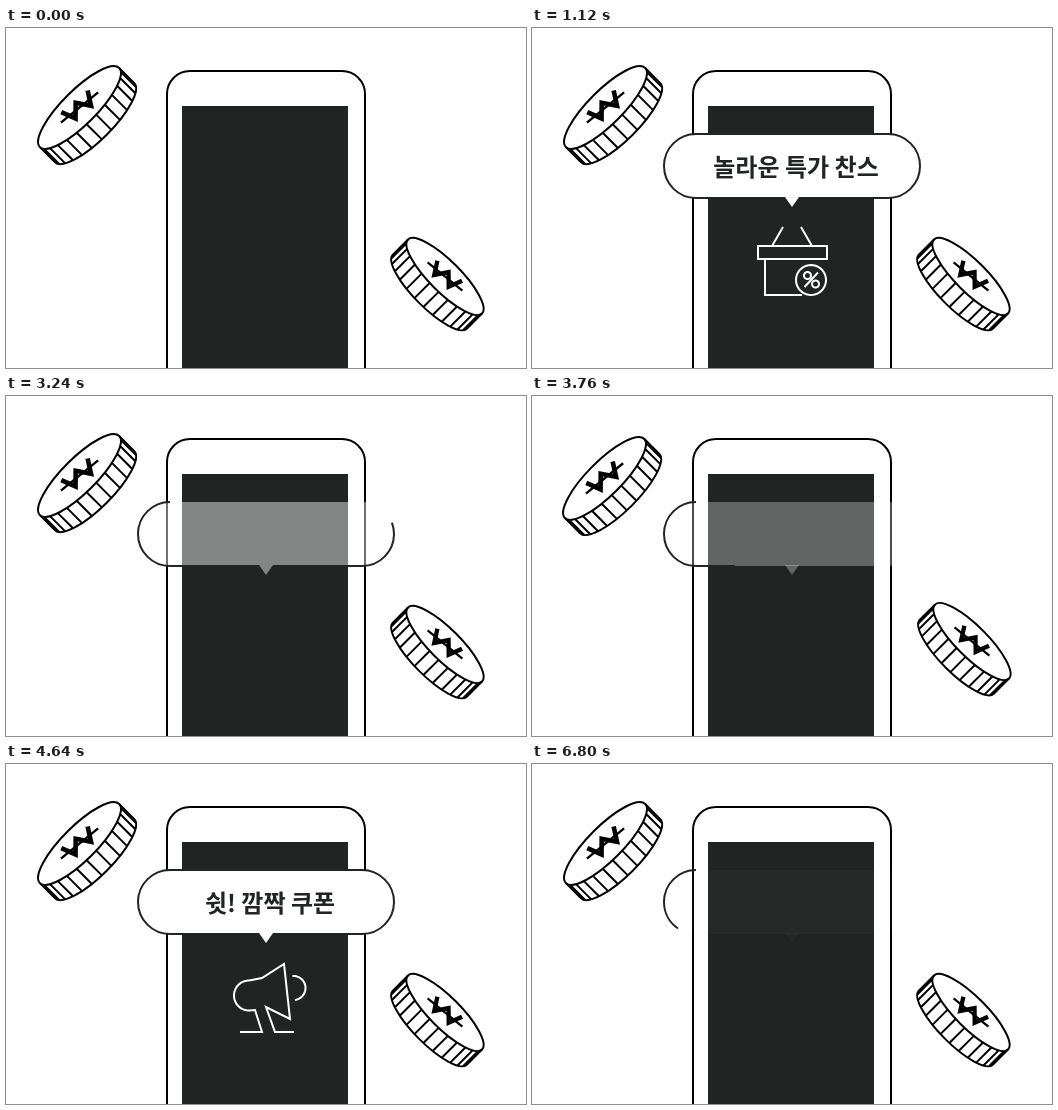
Write an HTML page with a canvas that moves like this. It is 520x340 px and loops after 6840 ms.

```html
<!DOCTYPE html>
<html lang="ko">
<head>
<meta charset="utf-8">
<style>
html, body { margin: 0; width: 100%; height: 100%; overflow: hidden; background: #fff; }
canvas { display: block; }
</style>
</head>
<body>
<canvas id="stage" width="520" height="340"></canvas>
<script>
const ctx = document.getElementById('stage').getContext('2d');
const LOOP = 6840, STEP = 40;
const INK = '#222424';
const { PI, sin, cos, hypot, min, max } = Math;

const clamp = v => min(1, max(0, v));
const ramp = (t, from, to) => clamp((t - from) / (to - from));
const ease = p => (1 - cos(PI * p)) / 2;

function arc(x, y, r, from, to, steps = 40) {
  return Array.from({ length: steps + 1 }, (_, i) => {
    const a = (from + (to - from) * i / steps) * PI;
    return [x + r * cos(a), y + r * sin(a)];
  });
}

const basket = [
  [[269, 199], [280, 218], [295, 218], [295, 231], [226, 231], [226, 218], [280, 218]],
  [[240, 218], [251, 199]],
  [[233, 232], [233, 267], [270, 267]],
  arc(279, 252, 15, 0.75, 2.75)
];
const percent = [
  [[272.5, 259], [286, 244.5]],
  arc(275.5, 247.5, 3.5, 0, 2),
  arc(283.5, 256, 3.5, 0, 2)
];
const megaphone = [
  [[234, 268], [256, 268], [249, 246], ...arc(243, 231.5, 15, 0.5, 1.5),
    [256, 214], [278, 200], [284, 255], [260, 243], [269, 268], [288, 268]],
  arc(287.5, 224, 12, -0.53, 0.46)
];

const scenes = [
  { start: 40, leave: 2760, end: 3400, text: '놀라운 특가 찬스',
    icons: [{ lines: basket, enter: [70, 680], exit: [70, 400] },
            { lines: percent, enter: [960, 1080], exit: [0, 100] }] },
  { start: 3640, leave: 6200, end: 6840, text: '쉿! 깜짝 쿠폰',
    icons: [{ lines: megaphone, enter: [160, 1000], exit: [-10, 400] }] }
];

const segment = (a, b) => hypot(b[0] - a[0], b[1] - a[1]);
const lengthOf = line => line.slice(1).reduce((sum, p, i) => sum + segment(line[i], p), 0);

// Strokes the first part of a list of polylines, one after another.
function trace(lines, amount) {
  if (amount <= 0) return;
  let left = amount * lines.reduce((sum, line) => sum + lengthOf(line), 0);
  ctx.beginPath();
  for (const line of lines) {
    if (left <= 0) break;
    ctx.moveTo(...line[0]);
    for (let i = 1; i < line.length && left > 0; i++) {
      const [a, b] = [line[i - 1], line[i]];
      const len = segment(a, b), k = len ? min(1, left / len) : 1;
      ctx.lineTo(a[0] + (b[0] - a[0]) * k, a[1] + (b[1] - a[1]) * k);
      left -= len;
    }
  }
  ctx.stroke();
}

function drawPhone() {
  ctx.lineWidth = 2;
  ctx.strokeStyle = '#000';
  ctx.fillStyle = '#fff';
  ctx.beginPath();
  ctx.roundRect(161, 43, 198, 340, 23);
  ctx.fill();
  ctx.stroke();
  ctx.fillStyle = INK;
  ctx.fillRect(176, 78, 166, 262);
}

function drawCoin(x, y, angle, a, b, depth) {
  ctx.save();
  ctx.translate(x, y);
  ctx.rotate(angle);
  ctx.lineWidth = 2;
  ctx.lineJoin = 'round';
  ctx.strokeStyle = '#000';

  ctx.beginPath();
  ctx.ellipse(0, 0, a, b, 0, 0, PI, true);
  ctx.lineTo(-a, depth);
  ctx.ellipse(0, depth, a, b, 0, PI, 0, true);
  ctx.closePath();
  ctx.fillStyle = '#fff';
  ctx.fill();
  ctx.stroke();

  // Ribs sit at equal angles around the rim, so they crowd towards the tips.
  ctx.beginPath();
  ctx.ellipse(0, 0, a, b, 0, 0, PI);
  const ribs = 13;
  for (let i = 1; i < ribs; i++) {
    const turn = PI * i / ribs;
    const rx = a * cos(turn), ry = b * sin(turn);
    ctx.moveTo(rx, ry);
    ctx.lineTo(rx, ry + depth);
  }
  ctx.stroke();

  ctx.rotate(-angle * 0.13);
  ctx.scale(a / 56, a / 56);
  ctx.lineJoin = 'miter';
  ctx.lineWidth = 4.6;
  ctx.beginPath();
  [[-17, -8], [-10, 6], [0, -6], [10, 6], [17, -8]].forEach(p => ctx.lineTo(...p));
  ctx.stroke();
  ctx.lineWidth = 2.4;
  ctx.beginPath();
  ctx.moveTo(-24, 0);
  ctx.lineTo(24, 0);
  ctx.stroke();
  ctx.restore();
}

function drawCoins(t) {
  let first = 0, second = 0;
  for (const { start } of scenes) {
    const dt = t - start;
    if (dt < 0 || dt > 680) continue;
    const dip = dt < 280;
    const wave = dip ? sin(PI * dt / 280) : -sin(PI * (dt - 280) / 400);
    first = wave * (dip ? 3 : 5.5);
    second = -wave * (dip ? 3 : 7.5);
  }
  drawCoin(73.5 - first / 3, 79.5 + first, -PI / 4, 56, 17, 21.5);
  drawCoin(439 - second / 3, 248.5 + second, PI / 4, 52.3, 15.5, 21.5);
}

function drawBubble(alpha, outline) {
  ctx.globalAlpha = alpha;
  ctx.fillStyle = '#fff';
  ctx.beginPath();
  ctx.roundRect(132, 106, 256, 64, 32);
  ctx.fill();
  ctx.globalAlpha = 1;

  const r = 32, run = 192, total = 2 * PI * r + 2 * run;
  if (outline > 0) {
    ctx.strokeStyle = INK;
    ctx.lineWidth = 2;
    ctx.setLineDash(outline < 1 ? [outline * total, total] : []);
    ctx.beginPath();
    ctx.arc(164, 138, r, -PI / 2, PI / 2, true);
    ctx.arc(356, 138, r, PI / 2, -PI / 2, true);
    ctx.closePath();
    ctx.stroke();
    ctx.setLineDash([]);
  }

  ctx.globalAlpha = alpha;
  ctx.beginPath();
  [[253, 169], [267, 169], [260, 179]].forEach(p => ctx.lineTo(...p));
  ctx.fill();
  ctx.globalAlpha = 1;
}

function drawScene({ start, leave, end, text, icons }, t) {
  if (t < start || t >= end) return;
  const dt = t - start, out = t - leave;
  const leaving = out >= 0;

  drawBubble(
    ease(leaving ? 1 - ramp(out, 305, 632) : ramp(dt, 0, 330)),
    ease(leaving ? 1 - ramp(out, 320, 690) : ramp(dt, 0, 370)));

  const typed = leaving
    ? text.length - Math.floor(out / 40)
    : Math.floor((dt - 260) / 50) + 1;
  ctx.fillStyle = INK;
  ctx.font = 'bold 24px "Noto Sans CJK KR", "Noto Sans CJK JP", "Noto Sans CJK", sans-serif';
  ctx.textAlign = 'center';
  ctx.fillText(text.slice(0, max(0, typed)), 264, 148);

  ctx.strokeStyle = '#fff';
  ctx.lineWidth = 2;
  ctx.lineJoin = 'miter';
  for (const { lines, enter, exit } of icons) {
    trace(lines, leaving ? 1 - ramp(out, ...exit) : ramp(dt, ...enter));
  }
}

function render(now) {
  const t = Math.floor((now % LOOP) / STEP) * STEP;
  ctx.fillStyle = '#fff';
  ctx.fillRect(0, 0, 520, 340);
  drawPhone();
  drawCoins(t);
  scenes.forEach(scene => drawScene(scene, t));
}

let origin;
function tick(now) {
  origin ??= now;
  render(now - origin);
  requestAnimationFrame(tick);
}
render(0);
requestAnimationFrame(tick);
</script>
</body>
</html>
```
